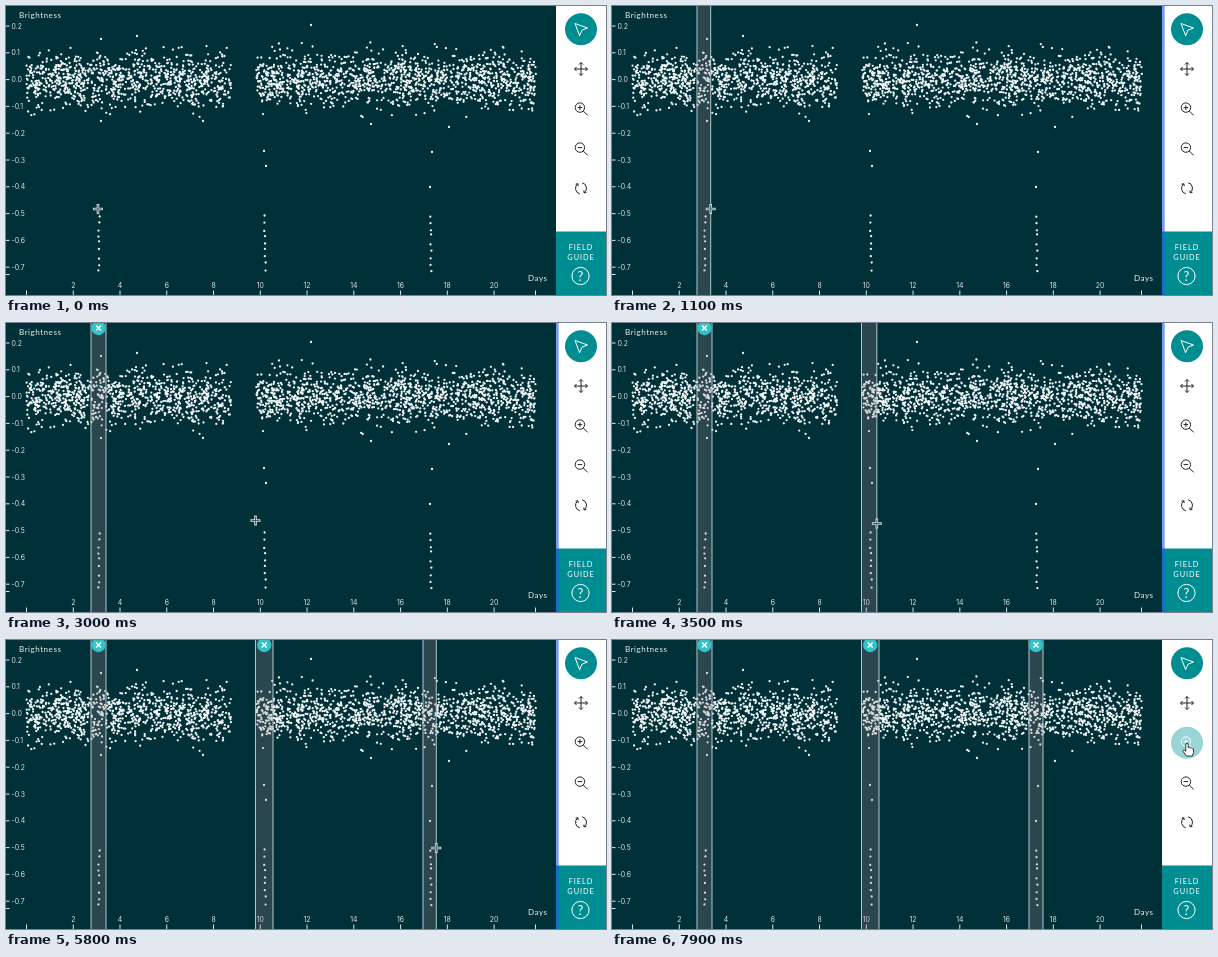
These frames come from a looping animation (600 px wide and 289 px high, 8 s). An HTML page:

```html
<!DOCTYPE html>
<html lang="en">
<head>
<meta charset="utf-8">
<style>
html, body { margin: 0; width: 100%; height: 100%; overflow: hidden; background: #013138; }
svg { display: block; font-family: Lato, sans-serif; }
.axis { font: 6.9px Inter, sans-serif; fill: #dfe8e8; }
.title { font-size: 8.1px; letter-spacing: .5px; fill: #e6eeee; }
.icon { fill: none; stroke: #222; stroke-width: 1; }
.white { stroke: #fff; }
</style>
</head>
<body>
<svg id="stage" width="600" height="289" viewBox="0 0 600 289">
  <rect width="550" height="289" fill="#013138"/>
  <path id="dots" stroke="#f0f6f7" stroke-width="2.3" stroke-linecap="round"/>
  <path id="ticks" stroke="#dde6e6" stroke-width="1"/>
  <g id="labels" class="axis"></g>
  <text class="title" x="13" y="12">Brightness</text>
  <text class="title" x="522" y="275">Days</text>
  <g id="boxes"></g>

  <rect x="550" width="50" height="226" fill="#fff"/>
  <rect x="550" y="225.5" width="50" height="64" fill="#008d92"/>
  <rect id="focus" x="550" width="2.7" height="289" fill="rgba(30,90,235,.6)"/>
  <circle cx="575" cy="23.3" r="16" fill="#008d92"/>
  <path class="icon white" d="M569 17.5L581.5 22L576 24.2L573.6 29.7Z" stroke-linejoin="round"/>
  <path class="icon" d="M568.5 63h13M575 56.5v13M570.5 61l-2 2l2 2M579.5 61l2 2l-2 2M573 58.5l2-2l2 2M573 67.5l2 2l2-2"/>
  <circle id="hover" cx="575" cy="102.8" r="16" fill="#99d5d7"/>
  <g id="zooms"></g>
  <path class="icon" d="M573.8 187.8a5.6 5.6 0 0 1-2.2-9.8M576.2 176.8a5.6 5.6 0 0 1 2.2 9.8M569.6 178.2l2.3-.5l.3 2.4M580.4 186.4l-2.3.5l-.3-2.4"/>
  <g fill="#fff" font-size="7.4" letter-spacing=".9" text-anchor="middle">
    <text x="575" y="243.5">FIELD</text>
    <text x="575" y="253.5">GUIDE</text>
  </g>
  <circle class="icon white" cx="574.5" cy="270" r="8.6"/>
  <text x="574.5" y="274.7" font-size="13" fill="#fff" text-anchor="middle">?</text>

  <g id="cross" fill="none">
    <path d="M-5 0H5M0-5V5" stroke="#d3dcde" stroke-width="2.6"/>
    <path d="M-4 0H4M0-4V4" stroke="#38565c" stroke-width=".9"/>
  </g>
  <path id="hand" fill="#fff" stroke="#222" stroke-width=".9" stroke-linejoin="round"
    d="M-1.2 5V-1.2Q0-2.6 1.2-1.2V2.5Q2.4 1.7 3.2 3Q4.5 2.4 5.1 3.6Q6.6 3.2 6.6 5V7.5L5.3 11H-.6L-4 6.4Q-4 4.4-2.2 5.4L-1.2 6.3Z"/>
</svg>
<script>
const LOOP = 8000;
const $ = id => document.getElementById(id);

let seed = 20417;
const rand = () => (seed = (seed * 16807) % 2147483647) / 2147483647;
const gauss = () => Math.sqrt(-2 * Math.log(rand())) * Math.cos(2 * Math.PI * rand());

const dayX = day => 20.5 + 23.38 * day;
const valueY = value => 73.6 - 268 * value;

// Light curve: a noisy band with a gap, periodic dips and a few stray points
const points = [[305, 19], [131, 30], [95, 33], [95, 115], [197, 115], [365, 118],
  [443, 121], [258, 145], [260, 160], [426, 146], [424, 181]];
for (let i = 0; i < 2400; i++) {
  const x = 20.5 + rand() * 484.5, noise = gauss() * .049;
  if (Math.abs(noise) < .14) points.push([x > 225 ? x + 25 : x, valueY(noise)]);
}
for (let x = 93; x < 500; x += 166) {
  for (let i = 0; i < 9; i++) points.push([x + rand() * 1.6 - .8, 207 + 7 * i + rand() * 4]);
}
$('dots').setAttribute('d', points.map(([x, y]) => `M${x.toFixed(1)} ${y.toFixed(1)}h0`).join(''));

// Axes
let ticks = `M0 268.5h3.5M${dayX(0)} 284.5v5M529.5 284.5v5`, labels = '';
for (let i = 2; i >= -7; i--) {
  const y = valueY(i / 10);
  ticks += `M0 ${y}h3.5`;
  labels += `<text x="5.5" y="${y + 2.5}">${(i / 10).toFixed(1)}</text>`;
}
for (let day = 2; day <= 20; day += 2) {
  ticks += `M${dayX(day)} 284.5v5`;
  labels += `<text x="${dayX(day)}" y="282.4" text-anchor="middle">${day}</text>`;
}
$('ticks').setAttribute('d', ticks);
$('labels').innerHTML = labels;

// Zoom icons: a lens with plus or minus
$('zooms').innerHTML = [[101.6, 'M573.9 99.3v4.6'], [141.6, '']].map(([y, bar]) =>
  `<path class="icon" d="M578.6 ${y}a4.7 4.7 0 1 0-9.4 0a4.7 4.7 0 1 0 9.4 0m-1.3 3.4l4.4 4.4M571.6 ${y}h4.6${bar}"/>`).join('');
const zoomIn = $('zooms').firstChild;

// Selections: edges, pointer height at both ends, and drag times
const selections = [
  { left: 85, right: 100, y0: 203, y1: 203, press: 600, settle: 1500, release: 1700 },
  { left: 249.5, right: 267, y0: 197.5, y1: 201, press: 3100, settle: 3900, release: 4050 },
  { left: 417, right: 431, y0: 208, y1: 208, press: 5300, settle: 6100, release: 6200 }
];
$('boxes').innerHTML = selections.map(s => `<g>
  <rect height="289" x="${s.left}" fill="rgba(160,130,140,.26)"/>
  <path stroke="#b9c7ca" stroke-width="1"/>
  <g transform="translate(${(s.left + s.right) / 2} 5)">
    <circle r="7.2" fill="#2fc3ca"/>
    <path d="M-2.5-2.5L2.5 2.5M-2.5 2.5L2.5-2.5" stroke="#fff" stroke-width="1.6"/>
  </g></g>`).join('');
const boxes = [...$('boxes').children];

// Pointer stops [time, x, y]: approach, drag, rest, leave
const stops = [
  [0, 92, 203],
  ...selections.flatMap(s => [
    [s.press - 200, s.left, s.y0], [s.press, s.left, s.y0],
    [s.settle, s.right, s.y1], [s.release + 200, s.right, s.y1]
  ]),
  [7400, 575, 105], [LOOP, 575, 105]
];
function pointer(t) {
  const i = stops.findIndex((p, n) => n && t <= p[0]);
  const [t0, x0, y0] = stops[i - 1], [t1, x1, y1] = stops[i];
  const k = 1 - (1 - (t - t0) / (t1 - t0)) ** 3;
  return [x0 + (x1 - x0) * k, y0 + (y1 - y0) * k];
}

const show = (el, on) => { el.style.display = on ? '' : 'none'; };

function draw(t) {
  const [x, y] = pointer(t);
  selections.forEach((s, i) => {
    const [rect, edges, close] = boxes[i].children;
    const right = t < s.release ? Math.max(s.left, Math.min(x, s.right)) : s.right;
    show(boxes[i], t >= s.press);
    show(close, t >= s.release);
    rect.setAttribute('width', right - s.left);
    edges.setAttribute('d', `M${s.left} 0V289M${right} 0V289`);
  });
  const overPanel = x > 550, overZoom = Math.hypot(x - 575, y - 102.8) < 16;
  show($('focus'), t >= selections[0].press && t < 7500);
  show($('hover'), overZoom);
  zoomIn.classList.toggle('white', overZoom);
  show($('cross'), !overPanel);
  show($('hand'), overPanel);
  for (const id of ['cross', 'hand']) $(id).setAttribute('transform', `translate(${x} ${y})`);
}

function frame(now) {
  draw(now % LOOP);
  requestAnimationFrame(frame);
}
draw(0);
requestAnimationFrame(frame);
</script>
</body>
</html>
```
